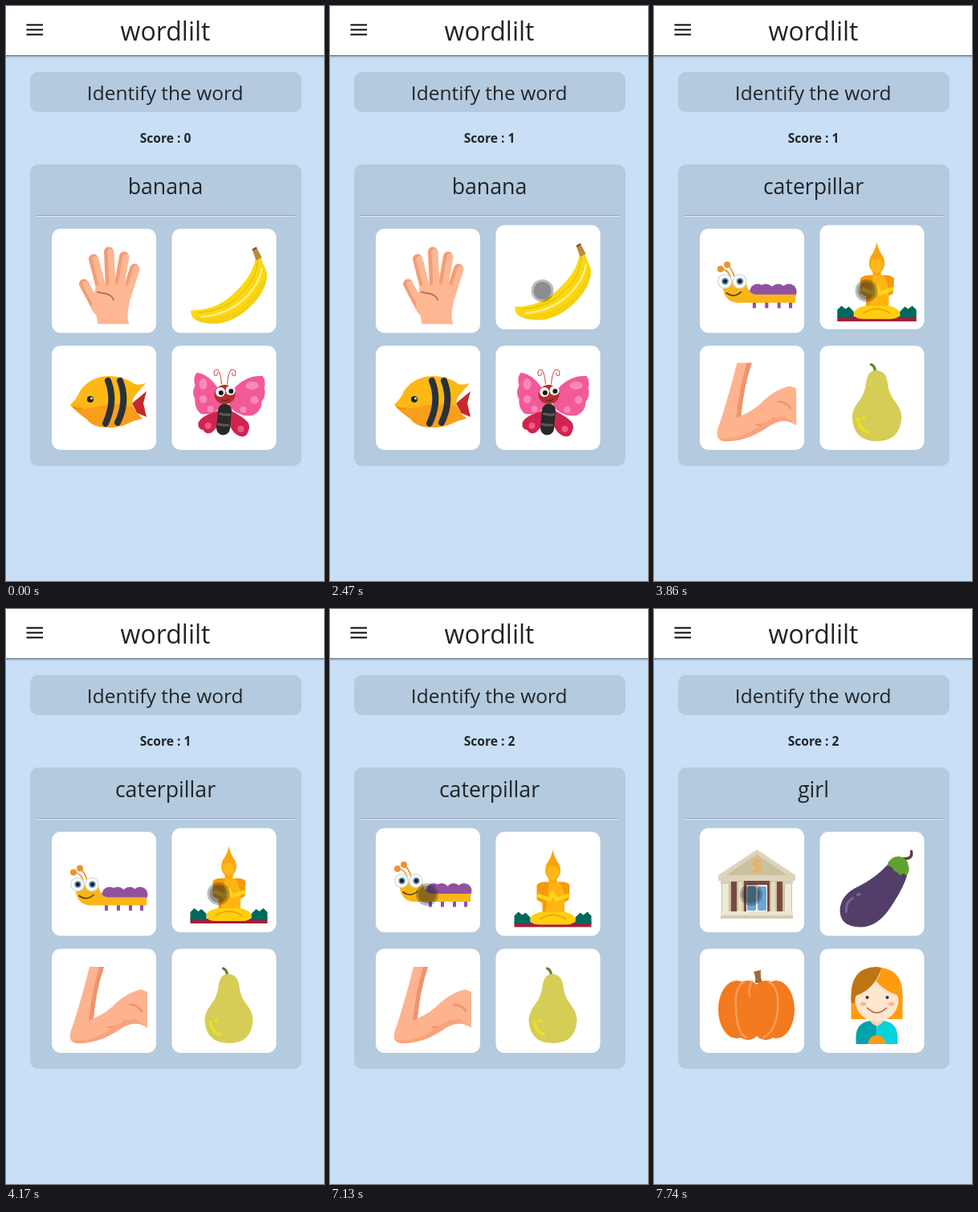
Animation, 396 px wide and 715 px high, one loop 8 s. Source, as an HTML page:

```html
<!DOCTYPE html>
<html lang="en">
<head>
<meta charset="utf-8">
<title>Identify the word</title>
<style>
  html, body { margin: 0; height: 100%; overflow: hidden; background: #c8dff5; }
  svg { display: block; width: 100vw; height: 100vh; }
  text { font-family: "Open Sans", "Noto Sans", sans-serif; fill: #212529; text-anchor: middle; }
  .header { fill: #fff; filter: drop-shadow(0 1px 1.5px #000a); }
  .panel { fill: #b4cade; }
  .line { fill: none; stroke-linecap: round; stroke-linejoin: round; }
</style>
</head>
<body>
<svg viewBox="0 0 396 715">
  <rect width="396" height="715" fill="#c8dff5"/>
  <rect class="header" x="-5" y="-5" width="406" height="66"/>
  <path d="M25.500 23.500h20.500m-20.500 6h20.500m-20.500 6h20.500" stroke="#08080f" stroke-width="2.200"/>
  <text x="198.500" y="43" font-size="32">wordlilt</text>
  <rect class="panel" x="30" y="82" width="338" height="50" rx="10"/>
  <text x="198.200" y="117" font-size="24.500">Identify the word</text>
  <text id="score" x="198.500" y="170" font-size="15.600" font-weight="700"></text>
  <rect class="panel" x="30" y="197" width="338" height="375" rx="10"/>
  <text id="word" x="198.500" y="234" font-size="26.700"></text>
  <path d="M38 260.500h322" stroke="#8da3b8"/>
  <path d="M38 261.500h322" stroke="#e4edf5"/>
  <g id="cards"></g>
  <g id="touch" fill="#222" fill-opacity=".3">
    <circle r="14"/>
    <circle r="11"/>
  </g>
</svg>
<script>
const $ = id => document.getElementById(id);
const fill = (color, d) => `<path fill="${color}" d="${d}"/>`;
const line = (color, width, d) => `<path class="line" stroke="${color}" stroke-width="${width}" d="${d}"/>`;
const dot = (color, x, y, rx, ry = rx) => `<ellipse fill="${color}" cx="${x}" cy="${y}" rx="${rx}" ry="${ry}"/>`;
const box = (color, x, y, w, h, r = 0) => `<rect fill="${color}" x="${x}" y="${y}" width="${w}" height="${h}" rx="${r}"/>`;
const each = (list, draw) => list.map(draw).join('');

// Every picture is drawn in a 96 x 96 square.
const fingers = ['M17 46L34 78', 'M29 15L39 54', 'M48 6L50 50', 'M67 12L60 52', 'M80 27L69 62'];

const pictures = {
  hand:
    each(fingers, d => line('#f29c78', 12, d)) +
    fill('#fdb792', 'M32 48L70 46Q76 60 73 74Q70 84 73 96H34Q35 86 26 76Z') +
    each(fingers, d => `<g transform="translate(2.500 .5)">${line('#fdb792', 8, d)}</g>`) +
    line('#b9604b', 1.8, 'M34 56q6 2 10 2q8 2 10 8'),

  banana:
    fill('#fbd80f', 'M1 79Q33 79 54 58Q78 36 81 15L88 12Q89 18 94 28Q99 43 84 64Q62 91 36 95Q14 97 3 88Q0 84 1 79Z') +
    fill('#f5d00f', 'M94 28Q99 43 84 64Q62 91 36 95Q14 97 3 88Q48 94 74 66Q92 44 94 28Z') +
    line('#d9b813', 1, 'M10 82Q44 80 64 58Q82 40 84 18') +
    line('#fdec8a', 2.5, 'M14 87Q48 84 70 62Q87 44 89 27') +
    fill('#bd8b35', 'M77 3L82 0L89 13L82 17Z') + fill('#75552b', 'M77 3L82 0L83 2L78 5Z'),

  fish:
    fill('#c9272e', 'M77 49L95 34L91 49L95 66L83 61Z') +
    fill('#fdb815', 'M0 51Q8 44 12 34Q24 16 48 15Q66 15 80 25Q86 27 94 24L82 38Q77 44 77 49Q79 58 90 68Q80 70 72 74Q60 80 46 79Q28 79 20 68Q10 62 0 51Z') +
    fill('#f99d1c', 'M0 51Q14 58 30 54Q58 47 78 53Q80 60 90 68Q80 70 72 74Q60 80 46 79Q28 79 20 68Q10 62 0 51Z') +
    line('#263238', 8, 'M47 21Q57 46 44 74') + line('#263238', 8, 'M62 21Q72 46 59 73') +
    dot('#1c2429', 25, 44, 4) + dot('#fff', 26.5, 43, 1.4) +
    line('#e88812', 1.5, 'M4 54Q10 57 14 55'),

  butterfly:
    fill('#d02450', 'M36 58Q14 64 10 73Q9 82 16 82Q20 89 27 85Q38 76 40 62Z') +
    fill('#d02450', 'M50 58Q66 66 72 73Q75 79 72 84Q70 92 62 90Q50 86 46 66Z') +
    fill('#f25a97', 'M38 36Q24 12 8 11Q3 17 6 27Q1 35 6 44Q5 56 13 62Q28 65 40 52Z') +
    fill('#f25a97', 'M50 36Q66 14 90 15Q95 22 92 30Q95 39 89 47Q89 59 78 64Q60 67 48 52Z') +
    each([[16, 25, 5, 7], [16, 44, 5, 5], [25, 56, 4], [77, 27, 8, 5], [80, 45, 5], [66, 57, 4]], a => dot('#f889b6', ...a)) +
    each([[22, 77, 4], [63, 81, 4]], a => dot('#ee5a85', ...a)) +
    line('#d4605c', 1.2, 'M39 25Q38 12 34 7Q28 7 30 14Q34 16 34 11M46 25Q47 12 51 7Q58 7 56 14Q52 16 52 11') +
    line('#292929', 17, 'M43 58L41 80') +
    line('#5a5a5a', 3, 'M37 62q7 2 12 1M35 75q6 2 12 1') +
    dot('#b3302f', 43, 38, 13, 12) +
    each([[37.5, 35], [50, 33]], ([x, y]) => dot('#fff', x, y, 6) + dot('#16191b', x + .8, y + 1, 3)) +
    line('#6e1c20', 1.2, 'M40 45q5 2 8-1'),

  caterpillar:
    each([49, 59, 74, 87], x => dot('#9151a1', x, 55.5, 9.5)) +
    box('#9151a1', 38, 54, 57, 8) +
    each([43, 58, 73, 87], x => box('#9151a1', x, 67, 4, 8.5)) +
    line('#e9942f', 1.7, 'M4 28Q13 28 16 38M12 23Q19 29 21 38') +
    dot('#e9942f', 4, 28, 4) + dot('#e9942f', 12, 23, 4) +
    fill('#fab616', 'M6 42H35Q36 57 46 59H95V69H24Q6 68 6 42Z') +
    each([9, 27], x => dot('#d9dde0', x, 43, 9) + dot('#fff', x, 43, 7.5) + dot('#7faecb', x + .5, 43, 4.5) + dot('#20242a', x + .5, 43, 2.7)) +
    line('#593d17', 1.6, 'M11 57q9 7 18-1'),

  statue:
    box('#a51b3c', 0, 90, 96, 6) +
    fill('#00695c', 'M0 92V82L5 77L10 81L14 78L20 84V92ZM96 92V82L91 77L86 81L82 78L76 84V92Z') +
    fill('#f9a60c', 'M48 0Q50 10 56 18Q60 29 53 36V42H43V36Q36 29 40 18Q46 10 48 0Z') +
    fill('#ffb81a', 'M41 23Q48 18 55 23Q57 33 48 38Q39 33 41 23Z') +
    fill('#f59a08', 'M28 44Q31 39 43 40H54Q66 39 69 44L68 62L61 66V82H35V66L28 62Z') +
    fill('#ffb411', 'M43 40H54Q65 45 62 82H38Q42 58 43 40Z') +
    line('#ffd31c', 5, 'M31 57L44 62L48 54L52 62L66 57') +
    fill('#ffcf0e', 'M34 77H62Q76 80 76 87Q75 93 64 93H32Q21 93 20 87Q20 80 34 77Z') +
    line('#f19b08', 1.5, 'M32 86Q48 76 64 86'),

  arm:
    fill('#fdb38d', 'M24 0H42Q32 29 29 64Q46 57 58 44Q72 32 88 28L96 31V76Q82 65 64 76Q36 96 8 95Q-2 94 0 82Q12 48 24 0Z') +
    fill('#f0936e', 'M36 0H42Q32 29 29 64L23 67Q27 30 36 0Z') +
    line('#f0936e', 2.5, 'M48 75Q61 77 69 67M74 47Q84 47 89 55') +
    fill('#f7a37d', 'M1 91Q22 94 43 82Q66 65 82 65L96 76Q82 65 64 76Q36 96 8 95Z'),

  pear:
    line('#55862c', 3.2, 'M41 2Q46 4 46 11') +
    fill('#d5cd55', 'M47 9Q59 9 61 24Q62 37 71 48Q78 57 78 67Q76 95 48 95Q20 95 18 67Q18 57 25 48Q34 37 35 24Q37 9 47 9Z') +
    line('#e8df28', 4, 'M25 68Q26 80 37 84') + dot('#e8df28', 32, 67, 2.5),

  bank:
    box('#cec29c', 4, 40, 88, 44) +
    fill('#ddd5bb', 'M48 4L96 36V43H0V36Z') +
    fill('#cbc19e', 'M48 10L86 36H10Z') +
    `<text x="48" y="33" font-size="24" font-weight="600" style="fill:#f5ab58">$</text>` +
    each([5, 83], x => box('#eee9d9', x, 44, 8, 38) + box('#d8cfb5', x - 2, 43, 12, 4)) +
    each([16, 73], x => box('#7b4841', x, 44, 7, 38)) +
    each([25, 66], x => box('#e4dcc4', x, 44, 5, 38)) +
    box('#7b4841', 32, 43, 32, 39) + box('#f7f9fa', 35, 48, 26, 34) +
    each([36, 49], x => box('#6ca6d6', x, 50, 11, 30, 2)) +
    box('#eae4d2', 3, 81, 90, 5) + box('#d5ccb1', 3, 86, 90, 4),

  eggplant:
    fill('#533e69', 'M62 18Q76 20 86 30Q82 46 66 70Q49 97 26 96Q2 95 2 75Q3 55 26 45Q46 35 62 18Z') +
    line('#78649a', 3, 'M10 77Q9 65 18 60M24 56L27 55') +
    line('#633b38', 3.5, 'M80 11Q93 12 91 2') +
    fill('#60a232', 'M61 19Q64 8 76 8Q87 11 87 19Q90 26 85 32Q80 27 77 32Q72 26 70 27Q68 21 61 19Z'),

  pumpkin:
    fill('#9c6a3e', 'M44 6L53 4Q52 12 55 20H46Q47 12 44 6Z') +
    each([[23, 53, 23, 36], [72, 53, 23, 36], [37, 54, 22, 37], [59, 54, 22, 37]], a => dot('#f37a1e', ...a)) +
    line('#fa9d58', 2.5, 'M33 18Q20 24 22 52Q23 80 34 88M62 18Q76 24 74 52Q72 80 56 88M42 18Q37 26 39 36'),

  girl:
    box('#ff9b10', 16, 36, 64, 29) +
    fill('#00a2ab', 'M22 96V86Q23 69 40 67L48 74V96Z') +
    fill('#08d2dc', 'M74 96V86Q73 69 56 67L48 74V96Z') +
    fill('#fbd2b3', 'M40 58H56V68Q48 78 40 68Z') +
    dot('#fee6cf', 48, 41, 27) +
    fill('#bf7414', 'M16 45V32Q18 0 48 0L54 1Q46 27 22 36Q20 40 20 45Z') +
    fill('#ff9b10', 'M54 1Q80 5 80 34V45H76Q75 38 73 35Q58 30 47 18Q52 10 54 1Z') +
    each([36, 61], x => dot('#443029', x, 38, 2)) +
    each([31, 66], x => dot('#f9b797', x, 46, 4, 2.5)) +
    line('#b1694d', 1.6, 'M36 51Q48 63 60 51') +
    fill('#f99b1d', 'M37 96A11 11 0 0 1 59 96Z')
};

const rounds = [
  { start: -1e4, word: 'banana', names: ['hand', 'banana', 'fish', 'butterfly'] },
  { start: 3630, word: 'caterpillar', names: ['caterpillar', 'statue', 'arm', 'pear'] },
  { start: 7200, word: 'girl', names: ['bank', 'eggplant', 'pumpkin', 'girl'] }
];

const places = [[57, 277], [206.5, 277], [57, 422.5], [206.5, 422.5]];
$('cards').innerHTML = each(places, () => `<g>${box('#fff', 0, 0, 130, 129.5, 11)}<g></g></g>`);
const cards = [...$('cards').children];

const clamp = x => Math.min(1, Math.max(0, x));
const smooth = x => (x = clamp(x)) * x * (3 - 2 * x);
const backOut = x => { const u = clamp(x) - 1; return 1 + 2.7 * u ** 3 + 1.7 * u ** 2; };
let shown;

function draw(t) {
  const round = rounds.findLast(r => t >= r.start);
  if (round !== shown) {
    shown = round;
    $('word').textContent = round.word;
    cards.forEach((card, i) => card.lastChild.innerHTML = pictures[round.names[i]]);
  }
  $('score').textContent = `Score : ${t < 2010 ? 0 : t < 5660 ? 1 : 2}`;

  const lifts = [smooth((t - 5660) / 380), t < 5660 ? smooth((t - 2010) / 460) : 0, 0, 0];
  const zoom = .5 + .5 * backOut((t - round.start) / 540);
  cards.forEach((card, i) => {
    const [x, y] = places[i];
    card.setAttribute('transform', `translate(${x} ${y - 4.5 * lifts[i]})`);
    card.lastChild.setAttribute('transform', `translate(71 70.5) scale(${zoom}) translate(-48 -48)`);
  });

  const second = t >= 5660;
  const half = (t >= 1470 && t < 1550) || (t >= 4500 && t < 4570);
  $('touch').setAttribute('transform', `translate(${second ? 121 : 264.5} ${second ? 355 : 354})`);
  $('touch').setAttribute('opacity', half ? .5 : second || (t >= 1550 && t < 4500) ? 1 : 0);
}

function tick() {
  draw(performance.now() % 8000);
  requestAnimationFrame(tick);
}
tick();
</script>
</body>
</html>
```
